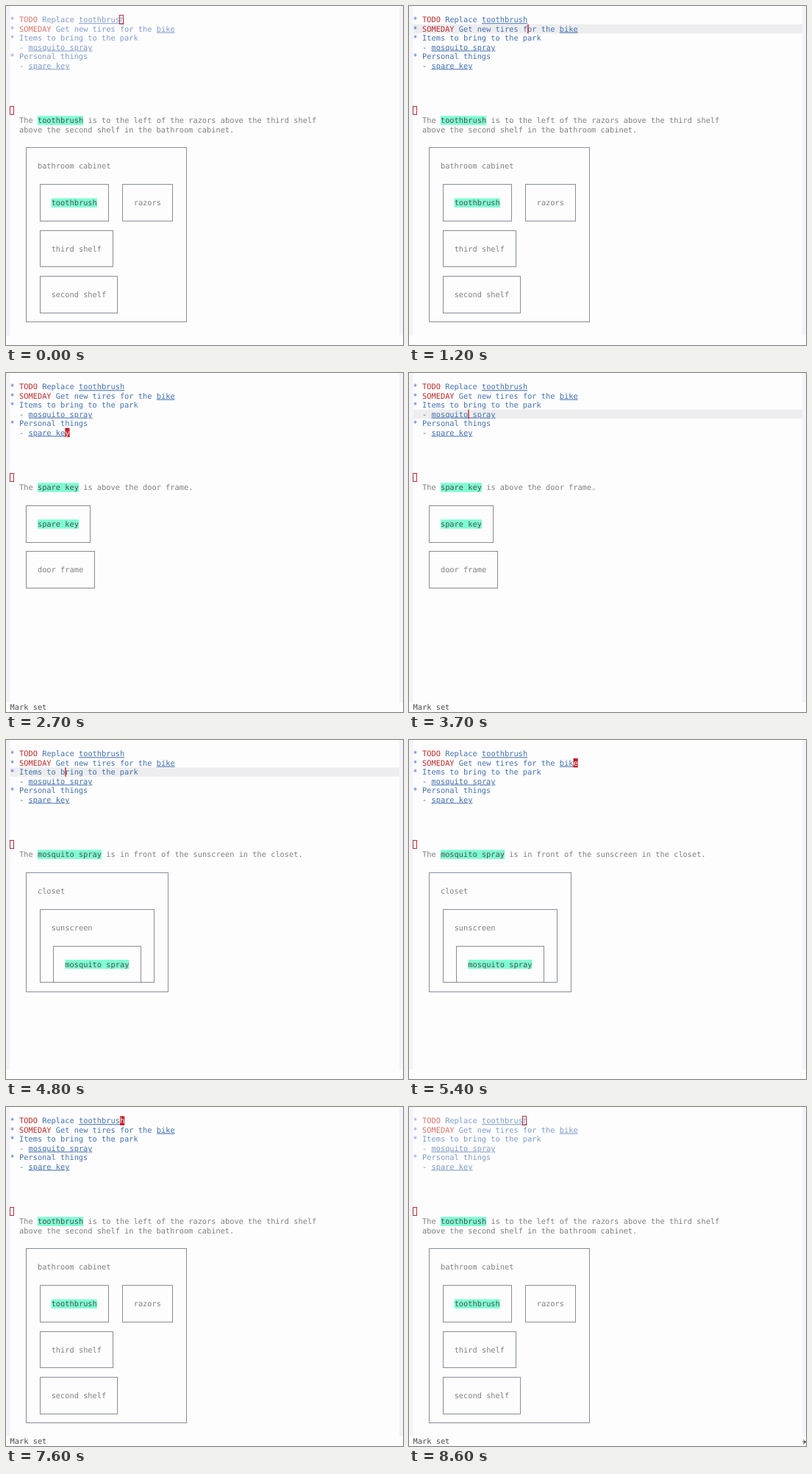
Recreate the animation shown at these times as an HTML page. Size 540 px wide and 461 px high, loop 9.3 s.

```html
<!DOCTYPE html>
<html lang="en">
<head>
<meta charset="utf-8">
<title>Notes and places</title>
<style>
  html, body { margin: 0; width: 100%; height: 100%; overflow: hidden; background: #fefdfe; }
  svg { display: block; width: 540px; height: 461px; }
  text {
    font: 10.34px "DejaVu Sans Mono", "Liberation Mono", monospace;
    text-rendering: geometricPrecision;
    fill: #7f7f7f;
  }
  .fringe { fill: #f4f3f7; }
  .line { fill: #ededef; }
  .head { fill: #4271ae; }
  .todo { fill: #b92a2a; }
  .link { fill: #4271ae; text-decoration: underline; }
  .dim .head, .dim .link { fill: #7f9cc8; }
  .dim .todo { fill: #d4776c; }
  .mark { fill: #7fffd4; }
  .hit, .echo { fill: #4d4d4c; }
  .box { fill: none; stroke: #878d9b; stroke-width: 1; }
  .plain .box { stroke: #8b8b8d; }
  .hollow { fill: none; stroke: #b5303a; stroke-width: 1; }
  .solid { fill: #bf2228; }
  .under { fill: #fff; }
  .mouse { fill: none; stroke: #333; stroke-width: 1; }
</style>
</head>
<body>
<svg id="stage" viewBox="0 0 540 461" xmlns="http://www.w3.org/2000/svg"></svg>
<script>
const CW = 6.225, RH = 12.45, LEFT = 5.6, LOOP = 9300;
const stage = document.getElementById('stage');
const colX = c => LEFT + c * CW;
const rowY = r => r * RH;
const crisp = v => Math.floor(v) + 0.5;

function add(parent, tag, cls, attrs = {}) {
  const el = document.createElementNS('http://www.w3.org/2000/svg', tag);
  if (cls) el.setAttribute('class', cls);
  set(el, attrs);
  parent.appendChild(el);
  return el;
}
function set(el, attrs) {
  for (const k in attrs) el.setAttribute(k, attrs[k]);
}
function show(el, on) {
  el.style.display = on ? '' : 'none';
}
function write(parent, row, col, str, cls) {
  const el = add(parent, 'text', cls, { x: colX(col), y: rowY(row) + 9.8 });
  el.textContent = str;
  return el;
}
function hit(parent, row, col, str) {
  add(parent, 'rect', 'mark', { x: colX(col), y: rowY(row), width: str.length * CW, height: RH });
  write(parent, row, col, str, 'hit');
}
// Boxes run through the centres of character cells.
function box(parent, c0, r0, c1, r1, dashed) {
  const x0 = crisp(colX(c0 + 0.5)), x1 = crisp(colX(c1 + 0.5));
  const y0 = crisp(rowY(r0 + 0.5)), y1 = crisp(rowY(r1 + 0.5));
  if (!dashed) {
    add(parent, 'rect', 'box', { x: x0, y: y0, width: x1 - x0, height: y1 - y0 });
    return;
  }
  const dash = size => `${size * 0.36} ${size * 0.14}`;
  add(parent, 'path', 'box', { d: `M${x0} ${y0}H${x1}M${x0} ${y1}H${x1}`, 'stroke-dasharray': dash(CW) });
  add(parent, 'path', 'box', { d: `M${x0} ${y0}V${y1}M${x1} ${y0}V${y1}`, 'stroke-dasharray': dash(RH) });
}
function sentence(parent, thing, rest) {
  write(parent, 12, 2, 'The');
  hit(parent, 12, 6, thing);
  write(parent, 12, 7 + thing.length, rest);
}

add(stage, 'rect', 'fringe', { x: 0, y: 0, width: 5.5, height: 448 });
add(stage, 'rect', 'fringe', { x: 535, y: 0, width: 5, height: 448 });
const line = add(stage, 'rect', 'line', { x: LEFT, width: 535 - LEFT, height: RH });

// Outline: row, column, text, class
const list = add(stage, 'g');
[
  [1, 0, '*', 'head'], [1, 2, 'TODO', 'todo'], [1, 7, 'Replace', 'head'], [1, 15, 'toothbrush', 'link'],
  [2, 0, '*', 'head'], [2, 2, 'SOMEDAY', 'todo'], [2, 10, 'Get new tires for the', 'head'], [2, 32, 'bike', 'link'],
  [3, 0, '* Items to bring to the park', 'head'],
  [4, 2, '-', 'head'], [4, 4, 'mosquito spray', 'link'],
  [5, 0, '* Personal things', 'head'],
  [6, 2, '-', 'head'], [6, 4, 'spare key', 'link']
].forEach(item => write(list, ...item));
const rows = ['', '* TODO Replace toothbrush', '* SOMEDAY Get new tires for the bike',
  '* Items to bring to the park', '  - mosquito spray', '* Personal things', '  - spare key'];

const hollowAt = (row, col) => ({ x: crisp(colX(col)), y: crisp(rowY(row)), width: 5, height: 12 });
add(stage, 'rect', 'hollow', { ...hollowAt(11, 0), height: 11 });

const scenes = [
  g => {
    sentence(g, 'toothbrush', 'is to the left of the razors above the third shelf');
    write(g, 13, 2, 'above the second shelf in the bathroom cabinet.');
    box(g, 3, 15, 38, 34);
    write(g, 17, 6, 'bathroom cabinet');
    box(g, 6, 19, 21, 23);
    hit(g, 21, 9, 'toothbrush');
    box(g, 24, 19, 35, 23);
    write(g, 21, 27, 'razors');
    box(g, 6, 24, 22, 28);
    write(g, 26, 9, 'third shelf');
    box(g, 6, 29, 23, 33);
    write(g, 31, 9, 'second shelf');
  },
  g => {
    g.setAttribute('class', 'plain');
    sentence(g, 'spare key', 'is above the door frame.');
    box(g, 3, 14, 17, 18);
    hit(g, 16, 6, 'spare key');
    box(g, 3, 19, 18, 23);
    write(g, 21, 6, 'door frame');
  },
  g => {
    sentence(g, 'mosquito spray', 'is in front of the sunscreen in the closet.');
    box(g, 3, 14, 34, 27);
    write(g, 16, 6, 'closet');
    box(g, 6, 18, 31, 26);
    write(g, 20, 9, 'sunscreen');
    box(g, 9, 22, 28, 26);
    hit(g, 24, 12, 'mosquito spray');
  },
  g => {
    g.setAttribute('class', 'plain');
    sentence(g, 'bike', 'is behind the shed.');
    box(g, 3, 14, 18, 23);
    write(g, 16, 6, 'shed');
    box(g, 6, 18, 15, 22, true);
    hit(g, 20, 9, 'bike');
  }
].map(draw => {
  const g = add(stage, 'g');
  draw(g);
  return g;
});

const echo = write(stage, 36, 0, 'Mark set', 'echo');
const cursor = add(stage, 'rect');
const under = write(stage, 1, 0, '', 'under');
const mouse = add(stage, 'path', 'mouse', { d: 'M535.5 455.5H540M536 452.5L540 456M536 458.5L540 455' });

// Each step changes only the values it names.
const steps = [
  [0, { row: 1, col: 24, mode: 'hollow', echo: false, scene: 0, mouse: false }],
  [300, { mode: 'block' }],
  [1100, { col: 25, mode: 'bar' }],
  [1200, { row: 2 }],
  [1300, { row: 3 }],
  [1400, { row: 4, col: 18 }],
  [1600, { row: 5, col: 17 }],
  [1800, { row: 6, col: 13 }],
  [2000, { col: 12, mode: 'block' }],
  [2400, { echo: true }],
  [2500, { scene: 1 }],
  [3200, { mode: 'bar', echo: false }],
  [3300, { row: 5 }],
  [3500, { row: 4 }],
  [3700, { echo: true }],
  [3800, { mode: 'block' }],
  [3900, { scene: 2 }],
  [4800, { row: 3, mode: 'bar', echo: false }],
  [4900, { row: 2 }],
  [5100, { mode: 'block' }],
  [5400, { col: 35 }],
  [5600, { echo: true }],
  [5700, { scene: 3 }],
  [6600, { row: 1, col: 25, mode: 'bar', echo: false }],
  [6800, { col: 24, mode: 'block' }],
  [7500, { echo: true }],
  [7600, { scene: 0 }],
  [8400, { mode: 'hollow' }],
  [8500, { mouse: true }]
];

function render(t) {
  const s = {};
  for (const [at, change] of steps) if (at <= t) Object.assign(s, change);
  const hollow = s.mode === 'hollow', bar = s.mode === 'bar', block = s.mode === 'block';

  list.setAttribute('class', hollow ? 'dim' : '');
  scenes.forEach((g, i) => show(g, i === s.scene));
  show(echo, s.echo);
  show(mouse, s.mouse);
  show(line, bar);
  line.setAttribute('y', rowY(s.row));

  cursor.setAttribute('class', hollow ? 'hollow' : 'solid');
  set(cursor, hollow ? hollowAt(s.row, s.col)
    : { x: colX(s.col), y: rowY(s.row), width: bar ? 1.4 : CW, height: RH });
  show(under, block);
  under.textContent = rows[s.row][s.col] || '';
  set(under, { x: colX(s.col), y: rowY(s.row) + 9.8 });
}

const start = performance.now();
function tick() {
  render((performance.now() - start) % LOOP);
  requestAnimationFrame(tick);
}
tick();
</script>
</body>
</html>
```
